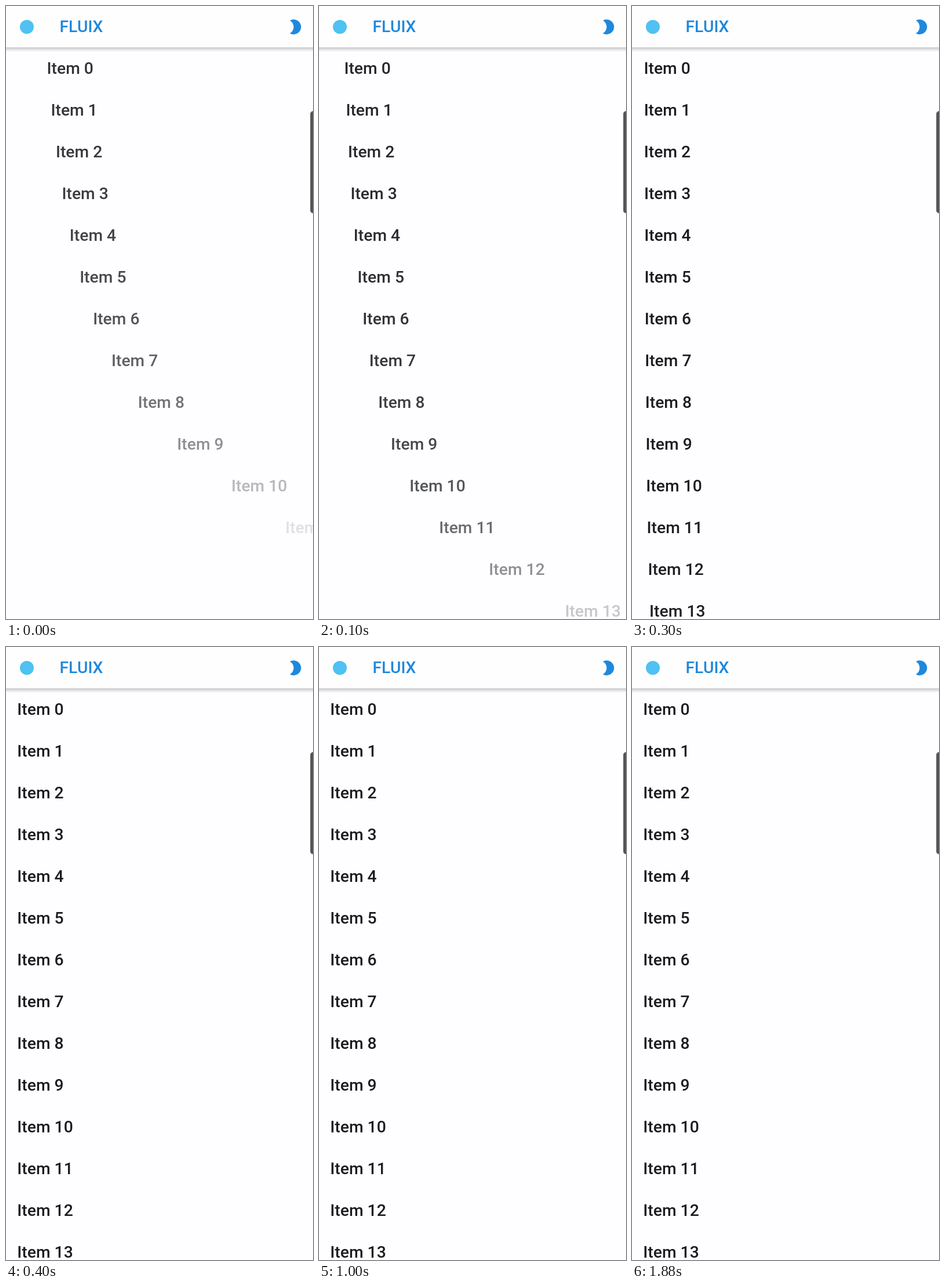
An HTML page that plays this animation: 530x1057 px, repeating every 2400 ms.

```html
<!DOCTYPE html>
<html lang="en">
<head>
<meta charset="utf-8">
<title>Staggered list</title>
<style>
  html, body { margin: 0; width: 100%; height: 100%; overflow: hidden; background: #fefdff; }
  svg { display: block; width: 100vw; height: 100vh; }
  text { font: 500 28.3px Roboto, sans-serif; white-space: pre; }
</style>
</head>
<body>
<svg viewBox="0 0 530 1057" preserveAspectRatio="none">
  <defs>
    <linearGradient id="shade" x1="0" y1="0" x2="0" y2="1">
      <stop offset="0" stop-color="#000" stop-opacity=".3"/>
      <stop offset=".3" stop-color="#000" stop-opacity=".15"/>
      <stop offset="1" stop-color="#000" stop-opacity="0"/>
    </linearGradient>
  </defs>
  <rect width="530" height="1057" fill="#fefdff"/>
  <g id="list" fill="#1a1c1e"></g>
  <rect y="71" width="530" height="8" fill="url(#shade)"/>
  <rect width="530" height="71.5" fill="#fefefe"/>
  <circle cx="36" cy="36" r="12" fill="#4fc1f2"/>
  <text x="92.4" y="45" fill="#1f88dc">FLUIX</text>
  <path transform="translate(483.7 20.6) scale(1.2864)" fill="#1f88dc"
    d="M10 2c-1.82 0-3.53.5-5 1.35C7.99 5.08 10 8.3 10 12s-2.01 6.92-5 8.65C6.47 21.5 8.18 22 10 22c5.52 0 10-4.48 10-10S15.52 2 10 2z"/>
  <rect x="525.5" y="181.5" width="16" height="175.5" rx="4.5" fill="#525252" stroke="#858585"/>
</svg>
<script>
const LOOP = 2400, TICK = 100, WIDTH = 530;
const LEFT = 19.3, TOP = 117, ROW = 72.03;
const SLOTS = 20, VISIBLE = 14;
const LEAD = 0.638, RATE = 0.000993; // entrance is already under way at the loop start

const list = document.getElementById('list');
const items = Array.from({ length: VISIBLE }, (_, i) => {
  const el = document.createElementNS('http://www.w3.org/2000/svg', 'text');
  el.textContent = 'Item ' + i;
  el.setAttribute('y', TOP + ROW * i);
  return list.appendChild(el);
});

const clamp = v => Math.min(1, Math.max(0, v));
const bez = (a, b, s) => 3 * a * s * (1 - s) ** 2 + 3 * b * s * s * (1 - s) + s ** 3;

// cubic-bezier(.4, 0, .2, 1)
function ease(x) {
  if (x <= 0 || x >= 1) return clamp(x);
  let lo = 0, hi = 1;
  for (let n = 0; n < 30; n++) {
    const mid = (lo + hi) / 2;
    if (bez(0.4, 0.2, mid) < x) lo = mid; else hi = mid;
  }
  return bez(0, 1, lo);
}

function draw(ms) {
  const t = Math.floor(ms / TICK) * TICK;
  const progress = clamp(LEAD + RATE * t);
  items.forEach((el, i) => {
    const begin = i / SLOTS;
    const k = ease((progress - begin) / (1 - begin));
    el.setAttribute('x', LEFT + WIDTH * (1 - k));
    el.setAttribute('opacity', k);
  });
}

const start = performance.now();
function loop() {
  draw((performance.now() - start) % LOOP);
  requestAnimationFrame(loop);
}
loop();
</script>
</body>
</html>
```
